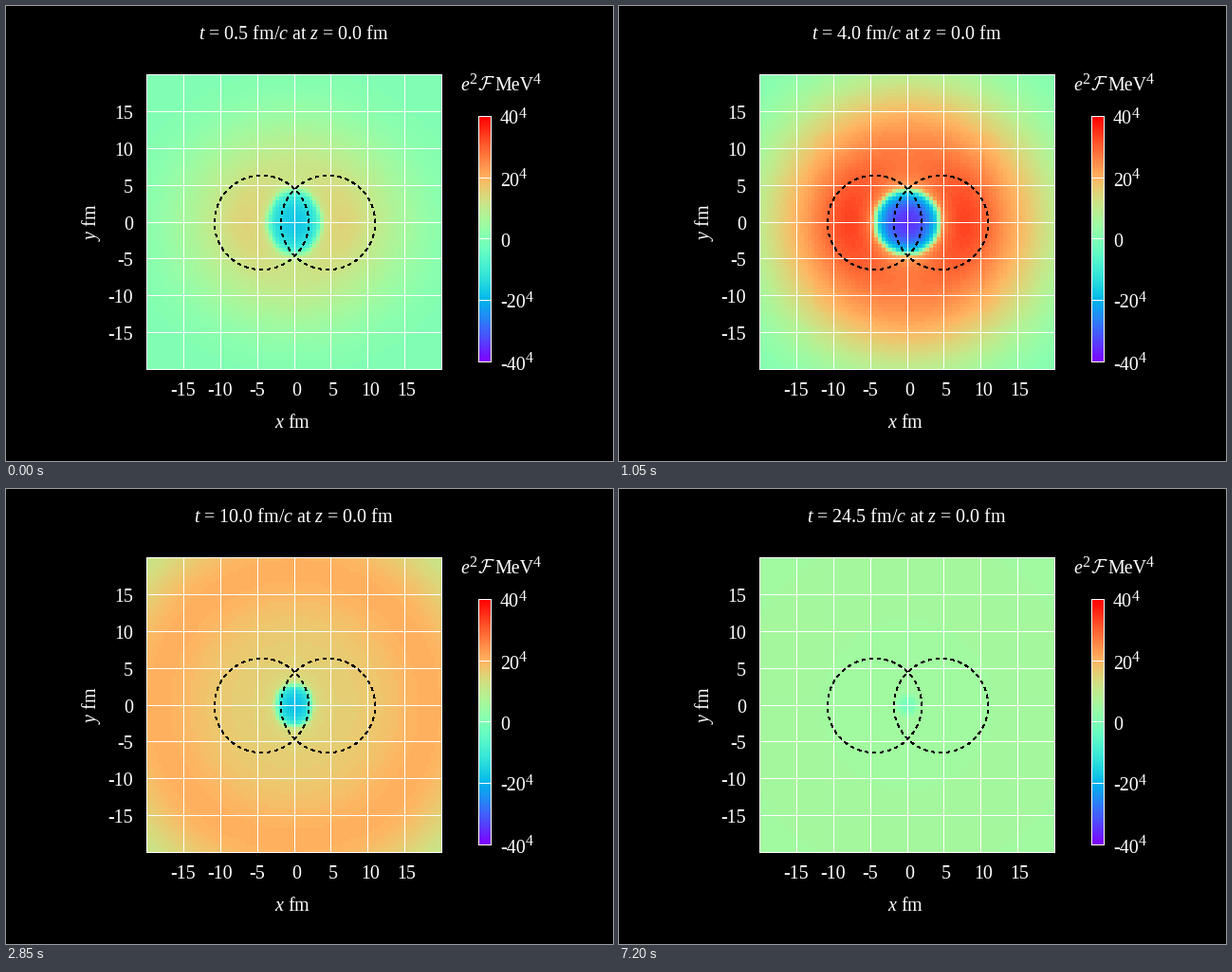
A matplotlib script that plays this animation: 640 by 480 pixels, repeating every 7.35 s.

```python
import numpy as np
import matplotlib.pyplot as plt
from matplotlib.animation import FuncAnimation
from matplotlib.patches import Rectangle

SERIF = "Liberation Serif"
plt.rcParams.update({
    "font.family": SERIF,
    "mathtext.fontset": "custom",
    "mathtext.rm": SERIF,
    "mathtext.it": SERIF + ":italic",
    "toolbar": "None",
})

W, H, DPI = 640, 480, 72
FRAMES, INTERVAL = 49, 150
LEFT, TOP, SIDE = 148, 72, 312
CX, CY = 304, 228
STEP = 38.87  # pixels per 5 fm

X, Y = np.meshgrid(np.linspace(-20, 20, 81), np.linspace(-20, 20, 81))


def ramp(t, a, b):
    """Smooth step from 0 at a to 1 at b."""
    u = np.clip((t - a) / (b - a), 0, 1)
    return u * u * (3 - 2 * u)


def bump(r, centre, width):
    return np.exp(-((r - centre) / width) ** 2)


def mix(a, b, u):
    return a + (b - a) * u


def ambient(t):
    """Field outside the core: a growing disc, then an outgoing pulse."""
    rise = 1 - np.exp(-t / 0.8)
    off = ramp(t, 7, 10)
    r = np.hypot(X, (1 + 0.17 * np.exp(-t / 2)) * Y) + 1e-9

    level = mix(30.5 * rise, 4.8 + 11 * np.exp((10 - t) / 5.5), off)
    level = level + off * 6 * bump(r, 2.2 * t - 2, 7.5)
    level += ramp(t, 10, 14) * 2.5 * np.exp((14 - t) / 5) * bump(r, 1.2 * (t - 10), 4)
    lobes = 6 * rise * (1 - off) * bump(r, 6.5 + 0.35 * t, 3.5 + 0.2 * t)
    level += lobes * (X / r) ** 2

    reach = 15.5 + 0.5 * t + 0.12 * t * t
    return level * np.exp(-(r / reach) ** (3 + 0.02 * t * t))


def field(t):
    """Signed fourth root of the invariant, averaged over cell corners."""
    start = np.exp(-t / 0.75)
    fade = np.exp((10 - t) / 6)
    off = ramp(t, 7, 10)
    depth = mix(35 * (1 - start), 18 * fade, off)
    rx = mix(4.4 * (1 - 0.35 * start), 1 + 1.5 * fade, off)
    ry = mix(4.4, 1 + 1.9 * fade, off)

    d = np.hypot(X / rx, Y / ry)
    outside = ambient(t) * (1 - np.maximum(d, 1) ** -3.0) ** 0.25
    inside = -depth * np.sqrt(1 - np.minimum(d, 1) ** 2)
    v = outside + inside
    return (v[1:, 1:] + v[1:, :-1] + v[:-1, 1:] + v[:-1, :-1]) / 4


fig = plt.figure(figsize=(W / DPI, H / DPI), dpi=DPI, facecolor="black")
ax = fig.add_axes([0, 0, 1, 1])
ax.axis("off")
cmap = plt.get_cmap("rainbow", 128)


def put(x, y, s, size=20, ha="left", **kw):
    return ax.text(x, y, s, size=size, ha=ha, va="baseline", color="white", **kw)


def line(xs, ys):
    ax.plot(xs, ys, color="white", lw=1, snap=False,
            solid_capstyle="butt", zorder=3)


def frame(x, y, w, h):
    ax.add_patch(Rectangle((x + 0.5, y + 0.5), w - 1, h - 1, fill=False,
                           ec="white", lw=1, snap=False, zorder=4))


def show(data, box, origin):
    return ax.imshow(data, cmap=cmap, vmin=-40, vmax=40, extent=box,
                     origin=origin, interpolation="nearest", aspect="auto")


def title_text(t):
    return rf"$t$ = {t:.1f} fm/$c$ at $z$ = 0.0 fm"


# Field map
img = show(field(0.5), (LEFT, LEFT + SIDE, TOP + SIDE, TOP), "lower")

# Grid and tick labels
for k in range(-3, 4):
    gx = int(CX + k * STEP) + 0.5
    gy = int(CY - k * STEP) + 0.5
    line([gx, gx], [TOP, TOP + SIDE])
    line([LEFT, LEFT + SIDE], [gy, gy])
    put(CX + k * STEP + (2 if k >= 0 else -0.5), 411, f"{5 * k}", ha="center")
    put(134, CY - k * STEP + 7.5, f"{5 * k}", ha="right")
frame(LEFT, TOP, SIDE, SIDE)

# Nuclei
angle = np.linspace(0, 2 * np.pi, 200)
for side in (-1, 1):
    ax.plot(CX + 0.5 + side * 35 + 49.7 * np.cos(angle),
            CY + 0.5 - 49.7 * np.sin(angle), color="black", lw=1,
            ls=(0, (3, 4)), dash_capstyle="butt", antialiased=False, zorder=5)

# Colour bar
show(np.linspace(40, -40, 128)[:, None], (498, 512, 376, 116), "upper")
frame(498, 116, 14, 260)
for i in range(5):
    v = 40 - 20 * i
    y = int(116.3 + 64.75 * i) + 0.5
    line([498, 512], [y, y])
    put(521, y + 8, f"{v}")
    if v:
        put(541 if v > 0 else 547.5, y + 1, "4", 16)

# Captions
put(302.5, 445, r"$x$ fm", ha="center")
ax.text(102.5, CY, r"$y$ fm", size=20, rotation=90, color="white",
        ha="right", va="center")
put(479.5, 89, "e", style="italic")
put(488, 82, "2", 16)
put(497, 89, r"$\mathcal{F}$", math_fontfamily="cm")
put(515, 89, "MeV")
put(555.5, 82, "4", 16)
title = put(303, 35, title_text(0.5), ha="center")

ax.set_xlim(0, W)
ax.set_ylim(H, 0)


def update(i):
    t = 0.5 * (i + 1)
    img.set_data(field(t))
    title.set_text(title_text(t))
    return img, title


anim = FuncAnimation(fig, update, frames=FRAMES, interval=INTERVAL,
                     repeat=True, repeat_delay=0, blit=False)
plt.show()
```
